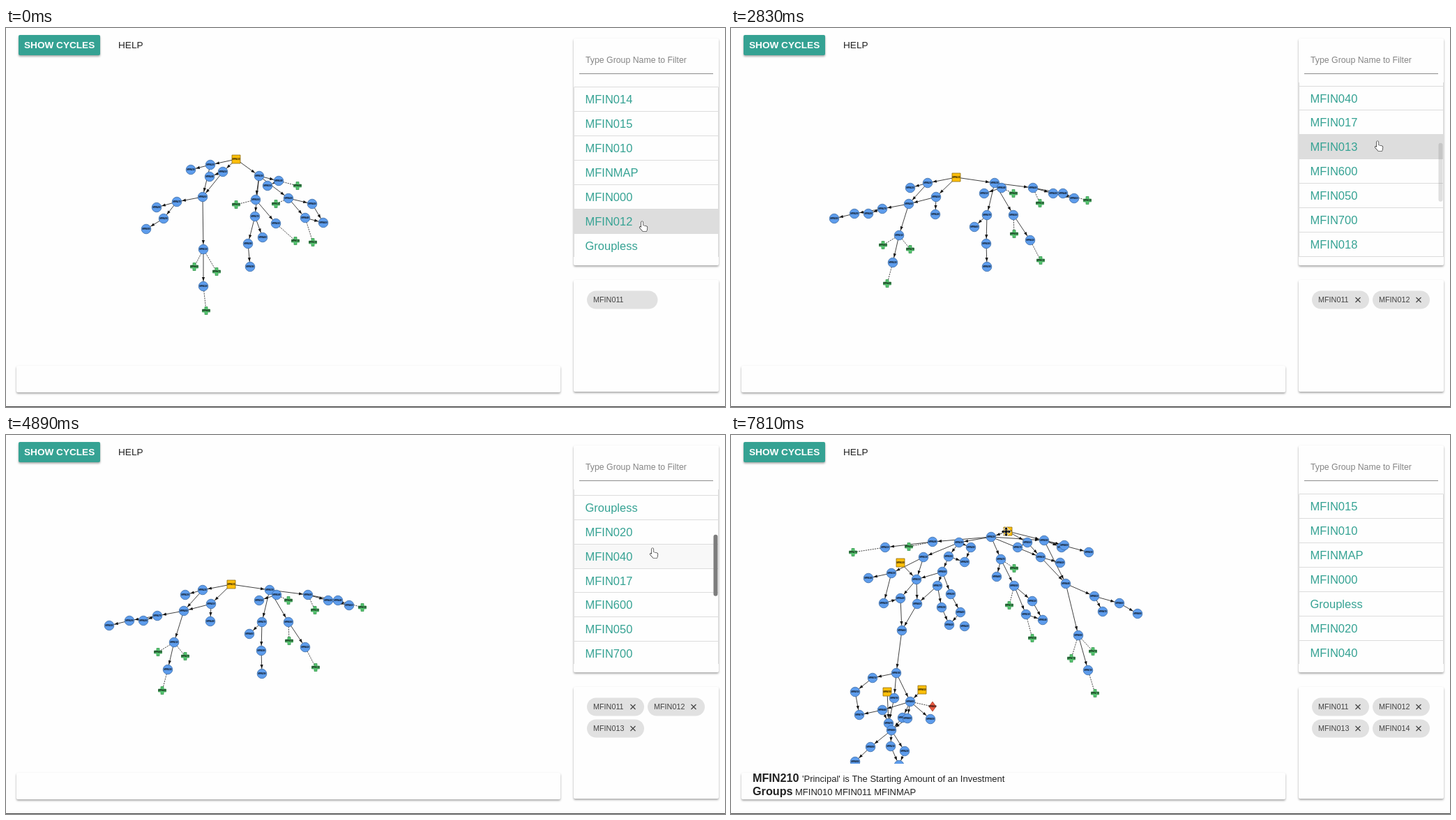
These frames come from a looping animation (1031 px wide and 543 px high, 8 s). An HTML page with a canvas:

```html
<!DOCTYPE html>
<html lang="en">
<head>
<meta charset="utf-8">
<title>Group graph</title>
<style>
html, body { margin: 0; width: 100%; height: 100%; overflow: hidden; background: #fefefe; }
canvas { display: block; }
</style>
</head>
<body>
<canvas id="stage" width="1031" height="543"></canvas>
<script>
const g = document.getElementById('stage').getContext('2d');
const LOOP = 8000, TEAL = '#35a293', ROW = 34.93, LIST_TOP = 84.5;
const FONT = '"Liberation Sans", Arial, sans-serif';

// The screen refreshes in bursts: [first, last, count]
const ticks = [[0, 0, 1], [150, 620, 4], [920, 1950, 8], [2100, 2830, 6], [3120, 4150, 8],
  [4300, 5330, 8], [5480, 6500, 8], [6640, 7660, 8], [7810, 7810, 1]]
  .flatMap(([a, b, n]) => Array.from({length: n}, (_, i) => a + (b - a) * i / Math.max(1, n - 1)));

const clamp = v => Math.min(1, Math.max(0, v));
const mix = (a, b, k) => a + (b - a) * k;
const linear = k => k;
const smooth = k => k * k * (3 - 2 * k);
const easeOut = k => 1 - (1 - k) ** 3;

function track(keys, t, ease = linear) {
  const i = keys.findIndex(key => key[0] > t);
  if (i === 0) return keys[0].slice(1);
  if (i < 0) return keys[keys.length - 1].slice(1);
  const a = keys[i - 1], b = keys[i], k = ease((t - a[0]) / (b[0] - a[0]));
  return a.slice(1).map((v, j) => mix(v, b[j + 1], k));
}

// ---- graphs ----
const chains = text => text.split('|').flatMap(chain => {
  const ids = chain.split(' ').map(Number);
  return ids.slice(1).map((id, i) => [ids[i], id]);
});
const points = flat => flat.flatMap((x, i) => i % 2 ? [] : [[x, flat[i + 1]]]);

const small = {
  edges: chains('0 1 5 6 8 9|1 2|0 4 3|4 5|6 7|5 10 11 27|10 25|10 26|0 12 13 14|13 28|' +
    '12 16 17 18|16 19|12 15 20 30|15 29|12 21 22 24|21 23 24|21 31|23 32'),
  kind: i => i === 0 ? 'square' : i > 24 ? 'plus' : 'circle'
};
const early = points([330,188, 293,196, 265,203, 292,213, 311,206, 282,242, 245,249, 216,257, 226,273,
  201,288, 283,317, 283,370, 363,212, 391,219, 375,226, 358,246, 357,270, 347,309, 350,342, 368,300,
  387,280, 405,244, 439,252, 429,272, 455,279, 270,342, 302,349, 287,405, 418,226, 330,253, 415,305,
  387,252, 440,307]);
const middle = points([324,202, 285,209, 258,216, 285,234, 303,227, 270,253, 236,260, 212,267, 210,282,
  182,289, 263,308, 262,355, 371,209, 397,216, 379,224, 372,243, 362,265, 359,310, 364,344, 368,290,
  390,281, 421,237, 457,244, 450,264, 475,271, 242,329, 277,330, 264,388, 421,224, 349,250, 407,314,
  421,260, 462,297]);
const settled = points([323,214, 282,222, 257,229, 293,267, 294,242, 255,252, 217,259, 197,266, 177,266,
  148,273, 241,297, 232,336, 378,222, 388,229, 363,237, 405,268, 367,268, 366,309, 367,342, 349,285,
  429,304, 433,229, 462,237, 476,237, 492,244, 218,311, 257,317, 224,366, 405,237, 406,295, 444,333,
  443,251, 511,247]);

const upper = points([397,138, 373,146, 327,154, 289,153, 221,161, 255,160, 175,168, 344,161, 335,182,
  312,174, 276,175, 243,183, 230,198, 197,205, 266,207, 303,196, 296,216, 315,228, 302,247, 329,254,
  313,272, 335,274, 219,241, 243,234, 267,242, 245,280, 387,178, 381,203, 406,191, 406,216, 399,244,
  432,238, 423,257, 447,265, 432,291]);
const lower = points([425,154, 411,161, 449,151, 474,161, 478,158, 444,175, 472,183, 513,168, 480,213,
  521,231, 557,241, 533,253, 583,256, 498,287, 519,310, 488,320, 512,337, 522,370, 237,341, 203,348,
  178,368, 184,401, 224,368, 234,377, 257,382, 274,365, 289,389, 286,407, 217,394, 246,405, 253,406,
  226,413, 230,423, 200,447, 178,468, 229,446, 249,453, 241,473]);
const large = {
  nodes: [...upper, ...lower],
  edges: chains('0 1 2 9 15 16 18 20|1 3 4 6|3 5|2 10 12 13|2 7 8|9 8|10 14 23 25|11 14 24 25|12 22|' +
    '22 23|15 14|15 17 19 20|16 24|25 53').concat(
    chains('1 26 27|26 28|26 29 31 33|29 30|29 32 33|32 34|0 35 36|0 37 38|37 39|1 37 42|35 40 41|' +
    '1 40 43|37 43 44 45 47|44 46|43 48 51 52|48 49|48 50'),
    chains('53 54 55 56|53 58 66|53 59 62|60 59 61|59 63 56|63 66|57 66 67|59 64 67|59 65 67|' +
    '67 68 69|67 70 72|67 71 72')),
  kind: i => [0, 11, 57, 60].includes(i) ? 'square' : i === 61 ? 'diamond' :
    [5, 6, 28, 30, 34, 49, 50, 52].includes(i) ? 'plus' : 'circle'
};

const blend = (a, b, k) => a.map(([x, y], i) => [mix(x, b[i][0], k), mix(y, b[i][1], k)]);
const LARGE_START = 5600;

function currentGraph(t) {
  if (t >= LARGE_START) {
    const k = easeOut(clamp((t - LARGE_START) / 600));
    const nodes = large.nodes.map(([x, y]) =>
      [375 + (x - 375) * mix(.8, 1, k), 250 + (y - 250) * mix(1.15, 1, k)]);
    return {...large, nodes};
  }
  const u = t - [3090, 890, 0].find(start => t >= start);
  const nodes = u < 180 ? blend(early, middle, u / 180)
    : blend(middle, settled, easeOut(clamp((u - 180) / 420)));
  return {...small, nodes};
}

const shapes = {
  circle: ['#5d9cec', '#3c6ca8', new Path2D('M-6.8 0a6.8 6.8 0 1 0 13.6 0a6.8 6.8 0 1 0-13.6 0Z')],
  square: ['#ffbf0a', '#8f6d10', new Path2D('M-6-6H6V6H-6Z')],
  plus: ['#55c56f', '#3c9a54', new Path2D('M-2-5.5H2V-2H5.5V2H2V5.5H-2V2H-5.5V-2H-2Z')],
  diamond: ['#e9573f', '#a8452f', new Path2D('M0-7L5 0L0 7L-5 0Z')]
};

function drawGraph({nodes, edges, kind}) {
  g.save();
  g.beginPath(); g.rect(0, 50, 800, 421); g.clip();
  g.lineWidth = .8;
  g.strokeStyle = g.fillStyle = '#111';
  for (const [from, to] of edges) {
    const [x1, y1] = nodes[from], [x2, y2] = nodes[to];
    const dashed = ['plus', 'diamond'].includes(kind(to));
    g.setLineDash(dashed ? [2, 1.3] : []);
    g.beginPath(); g.moveTo(x1, y1); g.lineTo(x2, y2); g.stroke();
    if (dashed) continue;
    g.save();
    g.translate(x2, y2); g.rotate(Math.atan2(y2 - y1, x2 - x1));
    g.beginPath(); g.moveTo(-7.5, 0); g.lineTo(-13, -2.1); g.lineTo(-13, 2.1); g.fill();
    g.restore();
  }
  g.setLineDash([]);
  g.textAlign = 'center';
  nodes.forEach(([x, y], i) => {
    const [fill, edge, path] = shapes[kind(i)];
    g.save();
    g.translate(x, y);
    g.fillStyle = fill; g.strokeStyle = edge;
    g.fill(path); g.stroke(path);
    text('MFIN' + (210 + i * 10 % 700), 0, 1, 2.7, '#000', 'bold');
    g.restore();
  });
  g.restore();
}

// ---- page parts ----
function text(string, x, y, size, color, weight = '') {
  g.font = `${weight} ${size}px ${FONT}`;
  g.fillStyle = color;
  g.fillText(string, x, y);
}
function box(x, y, w, h, r, color) {
  g.fillStyle = color;
  g.beginPath(); g.roundRect(x, y, w, h, r); g.fill();
}
function card(x, y, w, h, color = '#fefefe') {
  g.save();
  g.shadowColor = 'rgba(0,0,0,.36)'; g.shadowBlur = 3; g.shadowOffsetY = 1.7;
  box(x, y, w, h, 2, color);
  g.restore();
}

const groups = ['MFIN014', 'MFIN015', 'MFIN010', 'MFINMAP', 'MFIN000', 'MFIN012', 'Groupless', 'MFIN020',
  'MFIN040', 'MFIN017', 'MFIN013', 'MFIN600', 'MFIN050', 'MFIN700', 'MFIN018', 'MFIN019', 'CYCLMAP',
  'CYCL000', 'MFIN016', 'MFIN800', 'MFIN030'];
const picks = [['MFIN011', -100], ['MFIN012', 900], ['MFIN013', 3100], ['MFIN014', LARGE_START]];

const scrollKeys = [[1850, 0], [2400, 246], [3400, 246], [4050, 432], [4350, 432], [5300, 0]];
const cursorKeys = [[1500, 911, 278], [2000, 926, 163], [5270, 926, 163], [5450, 926, 111],
  [6450, 926, 111], [6540, 820, 145], [6640, 655, 255], [6780, 655, 255], [7350, 393.5, 138.5],
  [7800, 393.5, 138.5], [7801, 394.5, 138.5]];
const scrollAt = t => track(scrollKeys, t, smooth)[0];

function slotAt(t) {
  const [x, y] = track(cursorKeys, t);
  return x > 815 ? Math.floor((y + scrollAt(t) - LIST_TOP) / ROW) : -1;
}
// Hover shade rises and falls over 350 ms
function shades(t) {
  const shade = groups.map(() => 0);
  for (let past = 600; past >= 0; past -= 20) {
    const slot = slotAt(t - past);
    shade.forEach((v, i) => shade[i] = clamp(v + (i === slot ? 1 : -1) * 20 / 350));
  }
  return shade;
}

function drawList(t) {
  const scroll = scrollAt(t), shade = shades(t);
  const names = groups.filter(name => !picks.some(([pick, at]) => pick === name && t >= at));
  const top = LIST_TOP - scroll, bottom = top + names.length * ROW;
  g.save();
  g.beginPath(); g.rect(814, 78, 208, 250); g.clip();
  names.forEach((name, i) => {
    const y = top + i * ROW;
    g.fillStyle = `rgba(0,0,0,${shade[i] * .13})`;
    g.fillRect(815, Math.round(y), 206, 35);
    text(name, 830.5, Math.round(y + 23.5), 16.5, TEAL);
  });
  g.fillStyle = '#dcdcdc';
  for (let i = 0; i <= names.length; i++) g.fillRect(815, Math.floor(top + i * ROW), 206, 1);
  g.fillRect(814, top, 1, bottom - top);
  g.fillRect(1021, top, 1, bottom - top);

  const ended = [2400, 4050, 5300].find((end, i) => t >= scrollKeys[2 * i][0] && t < end + 500);
  if (ended) {
    const height = names.length > 19 ? 84 : 88;
    g.globalAlpha = clamp(1 - (t - ended - 200) / 300);
    box(1014.5, 79.5 + scroll * (names.length > 19 ? .347 : .366), 6, height, 3, '#7d7d7d');
  }
  g.restore();
}

function drawChips(t) {
  picks.filter(([, at]) => t >= at).forEach(([name, at], i) => {
    const x = 833 + i % 2 * 87, y = 376.5 + Math.floor(i / 2) * 31, fresh = t - at < 140;
    box(x, y, fresh ? 101.5 : 82, 26, 13, '#e1e1e1');
    text(name, x + 9, y + 16.5, 10.8, '#444');
    if (fresh) return;
    g.strokeStyle = '#444'; g.lineWidth = 1.2;
    g.stroke(new Path2D(`M${x + 62.5} ${y + 9.5}l7 7m0-7l-7 7`));
  });
}

const pointers = {
  hand: new Path2D('M0 1Q0-1 1.2-1T2.5 1V5L7 6Q9 6.5 8.5 9L7.5 13H2L-2 8.5Q-3 6.5-1 7L0 8Z'),
  arrow: new Path2D('M0 0V11L2.5 8.5L4.5 13L6.3 12.2L4.4 8H8Z'),
  move: new Path2D('M0-6.5L2.5-4H1V-1H4V-2.5L6.5 0L4 2.5V1H1V4H2.5L0 6.5L-2.5 4H-1V1H-4V2.5L-6.5 0L-4-2.5V-1H-1V-4H-2.5Z')
};
function drawCursor(t) {
  const [x, y] = track(cursorKeys, t);
  const name = x > 815 ? 'hand' : t < 7350 ? 'arrow' : 'move';
  g.save();
  g.translate(x, y);
  g.lineWidth = 1.2;
  g.strokeStyle = name === 'hand' ? '#111' : '#fff';
  g.fillStyle = name === 'hand' ? '#fff' : '#000';
  g.stroke(pointers[name]); g.fill(pointers[name]);
  g.restore();
}

function draw(t) {
  g.fillStyle = '#fefefe';
  g.fillRect(0, 0, 1031, 543);
  card(18, 10, 117, 29, TEAL);
  text('SHOW CYCLES', 26, 28.5, 13.6, '#fff', 'bold');
  text('HELP', 161, 28.5, 13.6, '#222');

  card(15, 484, 780, 38);
  card(814, 15, 208, 325);
  card(814, 361, 208, 160);
  text('Type Group Name to Filter', 831, 49.5, 12.3, '#858585');
  g.fillStyle = '#8c8c8c';
  g.fillRect(822, 65, 192, 1);
  g.fillStyle = '#444';
  g.fillRect(0, 542, 1031, 1);

  drawList(t);
  drawChips(t);
  drawGraph(currentGraph(t));
  if (t >= 7350) {
    text('MFIN210', 31, 497, 16.2, '#222', 'bold');
    text("'Principal' is The Starting Amount of an Investment", 102, 497, 13, '#222');
    text('Groups', 31, 516, 16.2, '#222', 'bold');
    text('MFIN010 MFIN011 MFINMAP', 92, 516, 13, '#222');
  }
  drawCursor(t);
}

const start = performance.now();
let shown = -1;
function frame() {
  const t = (performance.now() - start) % LOOP;
  const tick = ticks.filter(at => at <= t).pop();
  if (tick !== shown) draw(shown = tick);
  requestAnimationFrame(frame);
}
frame();
</script>
</body>
</html>
```
